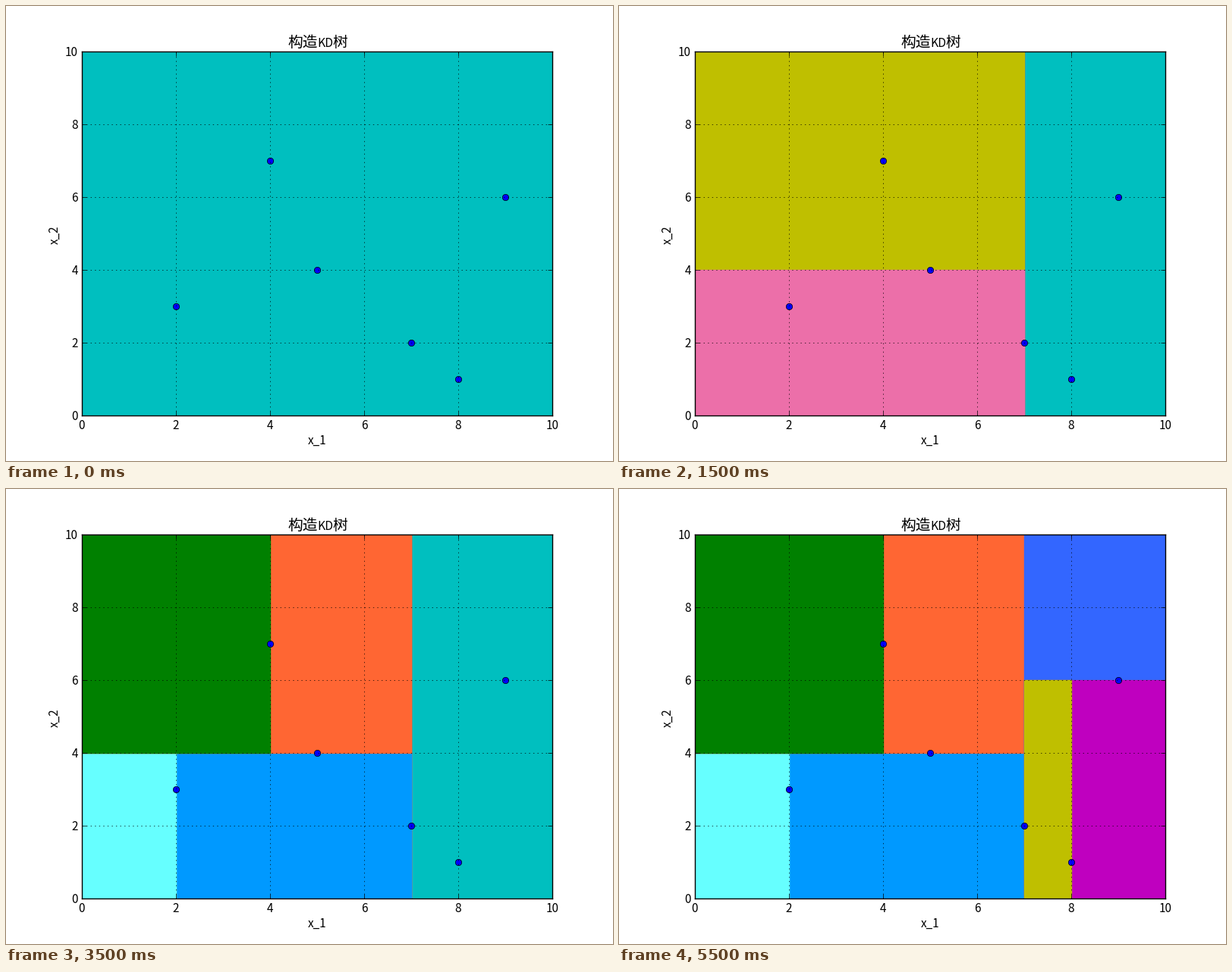
A matplotlib script that plays this animation: 800 px wide and 600 px high, repeating every 6000 ms.

```python
import matplotlib.pyplot as plt
from matplotlib.animation import FuncAnimation

plt.style.use("classic")
plt.rcParams["font.family"] = "Noto Sans CJK JP"

WIDTH, HEIGHT, DPI = 800, 600, 100
POINTS = [(2, 3), (5, 4), (9, 6), (4, 7), (8, 1), (7, 2)]

# One cell per step, painted over the earlier ones: x0, x1, y0, y1, colour.
CELLS = [
    (0, 10, 0, 10, "c"), (0, 7, 0, 10, "m"),
    (0, 7, 0, 10, "y"), (0, 7, 0, 4, "#ec6fa9"),
    (0, 7, 0, 4, "#0099ff"), (0, 2, 0, 4, "#66ffff"),
    (0, 7, 4, 10, "#ff6633"), (0, 4, 4, 10, "g"),
    (7, 10, 0, 10, "#3366ff"), (7, 10, 0, 6, "c"),
    (7, 10, 0, 6, "m"), (7, 8, 0, 6, "y"),
]

fig = plt.figure(figsize=(WIDTH / DPI, HEIGHT / DPI), dpi=DPI, facecolor="white")
ax = fig.add_axes([0.125, 0.1, 0.775, 0.8])


def label(x, y, text, size=11, ha="center", **kwargs):
    """Write text with its baseline at pixel (x, y), measured from the top left."""
    fig.text(x / WIDTH, 1 - y / HEIGHT, text, size=size, ha=ha,
             va="baseline", **kwargs)


patches = [ax.fill_between([x0, x1], [y0, y0], [y1, y1], color=color, linewidth=1)
           for x0, x1, y0, y1, color in CELLS]
ax.plot(*zip(*POINTS), "o", color="b", ms=6, mec="k", mew=0.5)

ax.set(xlim=(0, 10), ylim=(0, 10), xticks=range(0, 11, 2), yticks=range(0, 11, 2))
ax.grid(True)
ax.tick_params(labelbottom=False, labelleft=False)

for value in range(0, 11, 2):
    label(100 + 62 * value, 558, str(value))
    label(95, 545.5 - 48 * value, str(value), ha="right")
label(410, 578, "x_1")
fig.text(69 / WIDTH, 1 - 301.5 / HEIGHT, "x_2", size=11, rotation=90,
         rotation_mode="anchor", ha="center", va="baseline")

label(372, 54, "构造", size=14.2, ha="left")
label(420.5, 54, "KD", size=11.3)
label(430, 54, "树", size=14.2, ha="left")


def update(step):
    for i, patch in enumerate(patches):
        patch.set_visible(i <= step)
    return patches


anim = FuncAnimation(fig, update, frames=len(CELLS), interval=500,
                     repeat=True, repeat_delay=0, blit=False)
plt.show()
```
